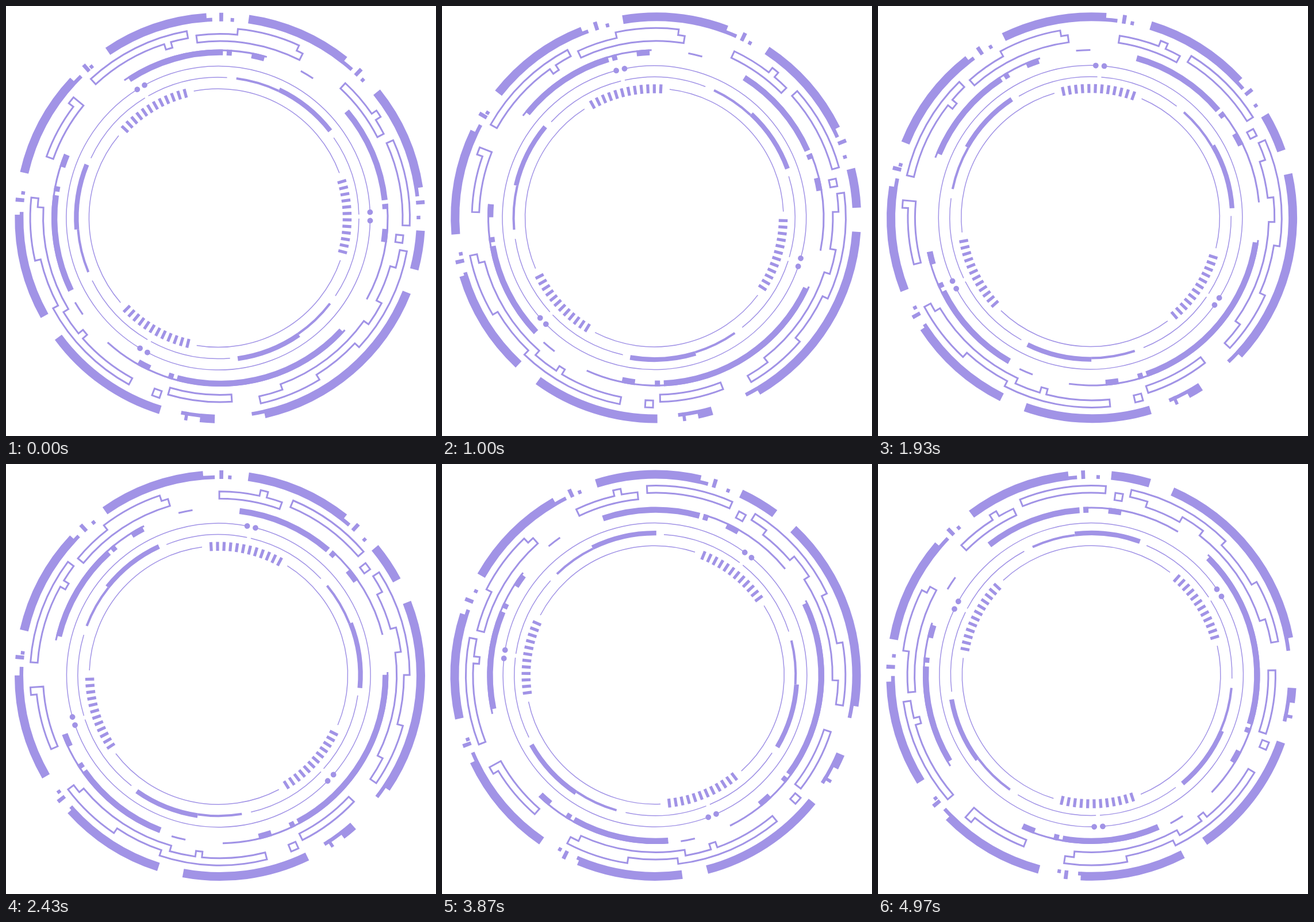
These frames come from a looping animation (748 px wide and 748 px high, 5.01 s). An HTML page with a canvas:

```html
<!DOCTYPE html>
<html lang="en">
<head>
<meta charset="utf-8">
<title>Rotating dial</title>
<style>
html, body { margin: 0; width: 100%; height: 100%; overflow: hidden; background: #fff; }
canvas { display: block; }
</style>
</head>
<body>
<canvas id="stage" width="748" height="748"></canvas>
<script>
const ctx = document.getElementById('stage').getContext('2d');
const COLOR = '#a193e6';
const LOOP = 5010, FRAME = 100 / 3, STEP = 0.59;
const rad = deg => deg * Math.PI / 180;

// Filled ring sector between two radii and two angles.
function band(r0, r1, from, to) {
  ctx.beginPath();
  ctx.arc(0, 0, r1, rad(from), rad(to));
  ctx.arc(0, 0, r0, rad(to), rad(from), true);
  ctx.fill();
}

function line(r, from, to) {
  ctx.lineWidth = 1.5;
  ctx.beginPath();
  ctx.arc(0, 0, r, rad(from), rad(to));
  ctx.stroke();
}

function dot(r, angle, size) {
  ctx.beginPath();
  ctx.arc(r * Math.cos(rad(angle)), r * Math.sin(rad(angle)), size, 0, 7);
  ctx.fill();
}

// Outer rim: a thick arc with a thin tail on its inner side.
const rimThick = (from, to) => band(342, 357, from, to);
const rimThin = (from, to) => band(342, 348.5, from, to);

function rimArc(from, to, tail = 0) {
  rimThick(from, to);
  if (tail) rimThin(to - 0.1, to + tail);
}

function outerRim() {
  // Five like arcs, each followed by a tick and a small square.
  for (let i = 0; i < 5; i++) {
    const odd = i % 2;
    const from = 150.85 + 42.6 * i - 0.45 * odd;
    const tail = 0.8 * (1 + Math.floor(i / 2)) + 1.7 * odd;
    const tick = from + 34.3 + odd;
    const square = tick + 2.9 + 0.95 * i - tail;
    rimArc(from, from + 30.1, tail);
    rimThick(tick - 0.55, tick + 0.55);
    rimThin(square - 0.5, square + 0.5);
  }
  rimArc(3.6, 14.8);
  rimArc(21.7, 77.2, 3.6);
  rimArc(91.5, 95.7, 5.6);
  rimThick(99.2, 100.1);
  rimArc(107.3, 143.6);
}

// One side of a plate: at each step the radius flips between two levels.
function edge(from, to, steps, high, low, up) {
  return [...steps, to].map((end, i) => ({
    r: high !== (i % 2 === 1) ? up : low,
    start: i ? steps[i - 1] : from,
    end
  }));
}

function plate(from, to, high, outerSteps = [], innerSteps = []) {
  const outer = edge(from, to, outerSteps, high, 320.2, 330.2);
  const inner = edge(from, to, innerSteps, high, 307.7, 317.7);
  ctx.lineWidth = 3;
  ctx.beginPath();
  for (const { r, start, end } of outer) ctx.arc(0, 0, r, rad(start), rad(end));
  for (const { r, start, end } of inner.reverse()) ctx.arc(0, 0, r, rad(end), rad(start), true);
  ctx.closePath();
  ctx.stroke();
}

function plates() {
  plate(-47.1, -27.2, false, [-34.5, -32.2]);
  plate(-24.2, 2.3, true);
  plate(5.4, 7.8, false);
  plate(10.1, 77.6, true, [42.9, 58.4], [15.8, 27.8, 35.6, 70]);
  plate(86.3, 106.4, false);
  plate(108.6, 111, true);
  plate(118.7, 186.2, true, [151.6, 167], [138.7, 140.8, 149, 183.4]);
  plate(199.5, 219.5, false, [217.2]);
  plate(227.1, 259.9, true, [], [252.2, 254.4]);
  plate(262.6, 296.7, false, [275.4, 294.6]);
}

// Solid ring: a thick arc, a small and a wide block after it, and a thin line.
const solid = (from, to) => band(283, 293.3, from, to);
const thin = (from, to) => band(290.2, 293.3, from, to);

function sweep(from, to, thinFrom, thinTo) {
  solid(from, to);
  solid(to + 1.3, to + 3.1);
  solid(to + 10, to + 14.5);
  thin(thinFrom, thinTo);
}

function solidRing() {
  sweep(-40.1, -6.2, -4.9, 29);
  sweep(42.8, 105, 41.9, 132.1);
  sweep(154.1, 187.9, 154.1, 202.4);
  sweep(236.8, 271, 235.2, 286.2);
  for (const dash of [-61.2, 144.9]) thin(dash, dash + 4.9);
}

// One third of the inner dial.
function innerThird() {
  line(264.3, 1.6, 118.4);
  dot(264.3, 1.6, 4.9);
  dot(264.3, -1.6, 4.9);

  line(244.7, 0.8, 34.2);
  band(242.7, 246.8, 38, 56);
  band(242.7, 251, 56, 82.7);
  line(244.7, 85.8, 119.2);

  line(224.8, 19.7, 100.2);
  for (let i = 0; i < 12; i++) {
    ctx.save();
    ctx.rotate(rad((i - 5.5) * 2.87));
    ctx.fillRect(216.5, -2.6, 15.5, 5.2);
    ctx.restore();
  }
}

// Each group turns around a pivot slightly off its own centre.
function turn(angle, offset, paint) {
  ctx.save();
  ctx.translate(371.2, 368.8);
  ctx.rotate(rad(angle));
  ctx.translate(offset, 0);
  paint();
  ctx.restore();
}

function draw(now) {
  const time = Math.floor(now % LOOP / 10) * 10;
  const angle = STEP * Math.min(149, Math.floor((time + 3.4) / FRAME));
  ctx.fillStyle = '#fff';
  ctx.fillRect(0, 0, 748, 748);
  ctx.fillStyle = ctx.strokeStyle = COLOR;

  turn(-angle, 1.1, () => {
    outerRim();
    plates();
    solidRing();
  });
  turn(angle, -2, () => {
    ctx.rotate(rad(-0.6));
    for (let i = 0; i < 3; i++) {
      innerThird();
      ctx.rotate(rad(120));
    }
  });
}

const start = performance.now();
function loop() {
  draw(performance.now() - start);
  requestAnimationFrame(loop);
}
loop();
</script>
</body>
</html>
```
